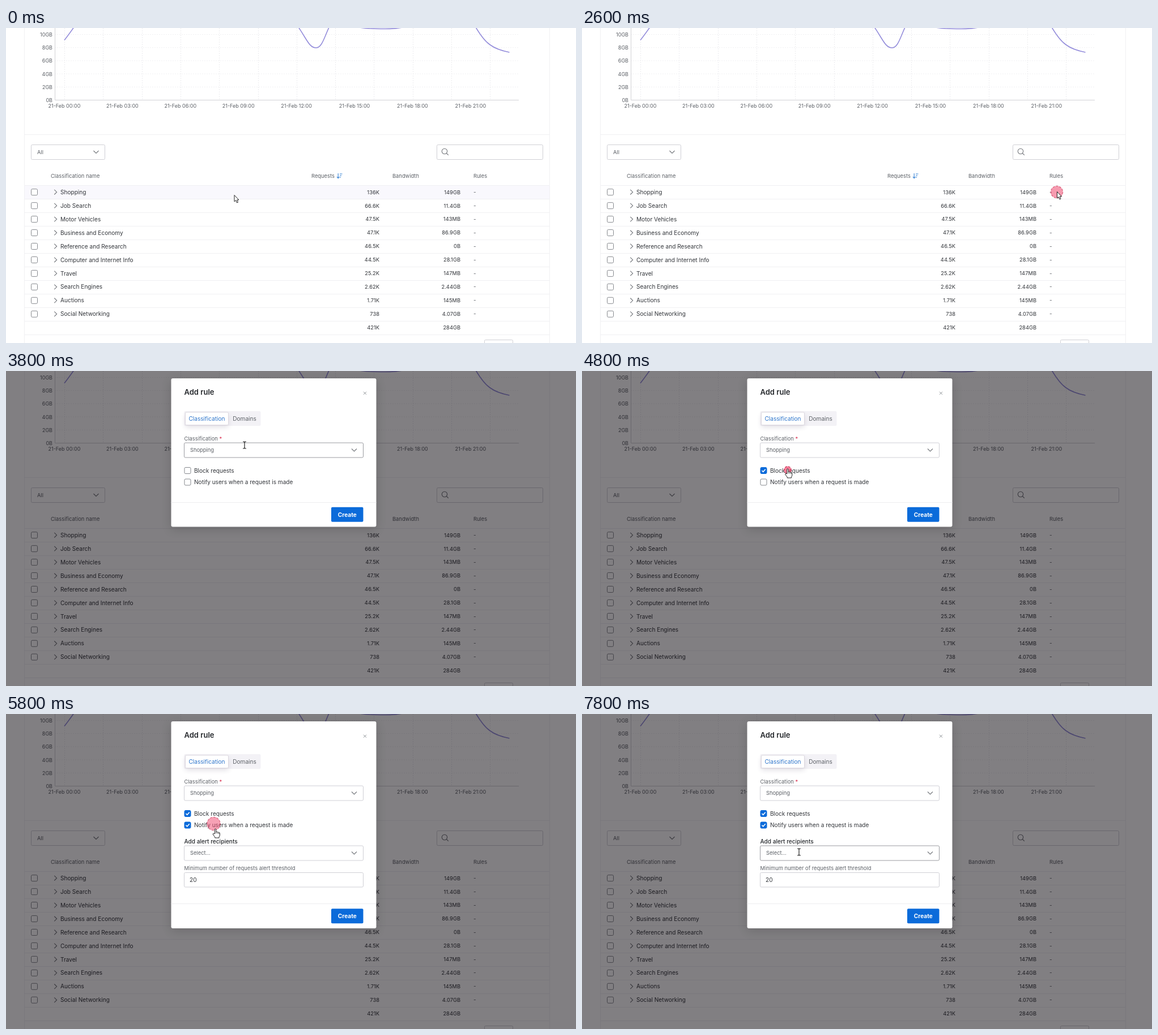
An HTML page with a canvas that plays this animation: 1006x557 px, repeating every 8000 ms.

```html
<!DOCTYPE html>
<html lang="en">
<head>
<meta charset="utf-8">
<title>Add rule</title>
<style>
  html, body { margin: 0; width: 100%; height: 100%; overflow: hidden; background: #fff; }
  canvas { display: block; }
</style>
</head>
<body>
<canvas id="stage" width="1006" height="557"></canvas>
<script>
const ctx = document.getElementById('stage').getContext('2d');
const LOOP = 8000, TICK = 200;
const SMALL = 9.36, BODY = 10.1;
const INK = '#33363b', GREY = '#5d6167', LINE = '#cfcfd5', FAINT = '#f0f0f3', BLUE = '#0b6bda';

const rows = [
  ['Shopping', '136K', '149GB'],
  ['Job Search', '66.6K', '11.4GB'],
  ['Motor Vehicles', '47.5K', '143MB'],
  ['Business and Economy', '47.1K', '86.9GB'],
  ['Reference and Research', '46.5K', '0B'],
  ['Computer and Internet Info', '44.5K', '28.1GB'],
  ['Travel', '25.2K', '147MB'],
  ['Search Engines', '2.62K', '2.44GB'],
  ['Auctions', '1.71K', '145MB'],
  ['Social Networking', '738', '4.07GB']
];

// time, x, y, pointer shape
const pointerKeys = [
  [0, 403, 296, 'arrow'], [800, 403, 296, 'arrow'], [1000, 428, 298, 'arrow'],
  [1200, 560, 303, 'arrow'], [1400, 760, 304, 'arrow'], [1600, 907, 299, 'arrow'],
  [2000, 838, 290, 'arrow'], [2200, 838, 290, 'hand'], [2600, 838.5, 290, 'arrow'],
  [2800, 839, 290, 'arrow'], [3000, 815, 288, 'arrow'], [3600, 450, 226, 'arrow'],
  [3800, 421, 131, 'beam'], [4000, 392, 98, 'arrow'], [4200, 374, 138, 'beam'],
  [4400, 363, 173, 'hand'], [5000, 363, 173, 'hand'], [5400, 366, 194, 'hand'],
  [5600, 366, 194, 'hand'], [5800, 369.5, 203, 'hand'], [6000, 375, 214, 'hand'],
  [6200, 383, 238, 'beam'], [7600, 383, 238, 'beam'], [7800, 383, 244, 'beam']
];

// start time, x, y
const clicks = [[2400, 838, 290], [4680, 363, 175], [5580, 366.5, 194]];

function pointerAt(t) {
  let i = pointerKeys.length - 1;
  while (pointerKeys[i][0] > t) i--;
  const a = pointerKeys[i], b = pointerKeys[i + 1] || a;
  const k = b === a ? 0 : (t - a[0]) / (b[0] - a[0]);
  return { x: a[1] + (b[1] - a[1]) * k, y: a[2] + (b[2] - a[2]) * k, shape: a[3] };
}

function text(str, x, y, { size = BODY, color = INK, weight = 400, align = 'left' } = {}) {
  ctx.font = `${weight} ${size}px Inter, sans-serif`;
  ctx.fillStyle = color;
  ctx.textAlign = align;
  ctx.fillText(str, x, y + size * 0.36);
}

function path(d, color, width = 1, fill) {
  const p = new Path2D(d);
  if (fill) { ctx.fillStyle = fill; ctx.fill(p); }
  if (color) { ctx.strokeStyle = color; ctx.lineWidth = width; ctx.stroke(p); }
}

function box(x, y, w, h, r, stroke, fill) {
  ctx.beginPath();
  ctx.roundRect(x, y, w, h, r);
  if (fill) { ctx.fillStyle = fill; ctx.fill(); }
  if (stroke) { ctx.strokeStyle = stroke; ctx.lineWidth = 1; ctx.stroke(); }
}

function shadow(color, blur, y) {
  ctx.shadowColor = color;
  ctx.shadowBlur = blur;
  ctx.shadowOffsetY = y;
}

const noShadow = () => shadow('transparent', 0, 0);
const chevronDown = (x, y) => path(`M${x - 4.5} ${y - 2.5}l4.5 4.5l4.5-4.5`, '#74777c', 1.1);

function checkbox(x, y, on) {
  box(x - 5.5, y - 5.5, 11, 11, 2, on ? BLUE : '#85888d', on ? BLUE : '#fff');
  if (on) path(`M${x - 3} ${y}l2.2 2.3l4-4.6`, '#fff', 1.5);
}

function drawChart() {
  ctx.setLineDash([2, 2]);
  for (let i = 0; i < 5; i++) path(`M86 ${11.5 + i * 23.2}H905`, '#f1f1f3');
  for (let i = 0; i < 12; i++) path(`M${Math.round(103 + i * 68.3) + 0.5} 0V127`, '#ececef');
  ctx.setLineDash([]);
  path('M86.5 0V127.5H905', '#d2d2d6');
  for (let i = 0; i < 6; i++) {
    text(i < 5 ? `${10 - 2 * i}GB` : '0B', 82, 11.7 + i * 23.2, { size: 9, color: GREY, align: 'right' });
  }
  for (let i = 0; i < 8; i++) {
    text(`21-Feb ${String(i * 3).padStart(2, '0')}:00`, 103 + i * 102.4, 137.7, { size: 9, color: GREY, align: 'center' });
  }
  path('M103 21.5C109 14 114 7 121 -3M515 -3C530 18 535 35 547 35C558 35 562 15 571 -3' +
    'M615 -3C630 1 640 .8 649 1.2C670 1.6 685 2 699 -1M828 -3C838 14 846 24 854 29.5C864 37 876 40.5 888.5 43', '#948ddb', 1.6);
}

function drawTable(hover) {
  path('M32.5 0V557M959.5 0V557M33 188.5H959', FAINT);
  box(44.5, 206.5, 130, 26, 2, LINE, '#fff');
  text('All', 55, 219.5, { size: SMALL, color: GREY });
  chevronDown(159, 219.5);
  box(760.5, 206.5, 187, 26, 2, LINE, '#fff');
  path('M778.7 218a4.7 4.7 0 1 1-9.4 0a4.7 4.7 0 1 1 9.4 0M777.5 221.5l3.3 3.3', '#74777c', 1.1);

  const head = { size: SMALL, color: GREY };
  text('Classification name', 79, 261.5, head);
  text('Requests', 539, 261.5, head);
  text('Bandwidth', 682, 261.5, head);
  text('Rules', 825, 261.5, head);
  path('M586.2 257V265.5M584 263.2l2.2 2.4l2.2-2.4M589 258h4.5M589 261h3.2M589 264h2', '#3b85d6', 1.1);

  if (hover) box(33, 278, 926, 24, 0, null, '#f9f8fd');
  const num = { size: SMALL, align: 'right' };
  path('M33 278.5H959', FAINT);
  rows.forEach(([name, requests, bandwidth], i) => {
    const y = 290.2 + i * 23.95;
    path(`M33 ${Math.round(y + 12) + 0.5}H959`, FAINT);
    checkbox(50, y, false);
    path(`M85.3 ${y - 4.3}l4.3 4.3l-4.3 4.3`, '#74777c', 1.1);
    text(name, 96, y);
    text(requests, 659, y, num);
    text(bandwidth, 802, y, num);
    text('-', 825, y, { color: GREY });
  });
  text('421K', 659, 529.7, num);
  text('284GB', 802, 529.7, num);
  path('M33 542.5H959', FAINT);
  box(844.5, 551.5, 50, 26, 2, LINE, '#fff');
}

function select(value, y, hover) {
  box(314.5, y + 0.5, 316, 26, 2, hover ? '#9a9ba0' : LINE, '#fff');
  ctx.save();
  ctx.beginPath();
  ctx.rect(315, y, 300, 18.5);
  ctx.clip();
  text(value, 325, y + 13.5, { size: SMALL, color: GREY });
  ctx.restore();
  chevronDown(614.5, y + 13.5);
}

function drawModal(t, pointer) {
  const blocked = t >= 4800, notify = t >= 5800;
  const bottom = notify ? 379 : 275.5;
  const over = y => pointer.shape === 'beam' && pointer.y > y && pointer.y < y + 26;

  ctx.save();
  if (t < 3000) ctx.translate(0, -10);
  shadow('rgba(0,0,0,.16)', 18, 4);
  box(291.5, 13, 362, bottom - 13, 3, null, '#fff');
  noShadow();

  text('Add rule', 314.5, 37, { size: 13, weight: 600, color: '#25282c' });
  path('M631 36.7l5 5M636 36.7l-5 5', '#8c8f94');
  box(314.5, 71, 135, 26, 2, null, '#f3f2f6');
  shadow('rgba(60,40,80,.14)', 8, 4);
  box(316.5, 73, 76, 22.5, 2, null, '#fff');
  noShadow();
  box(316.5, 73, 76, 22.5, 2, '#dcd8df');
  text('Classification', 354.5, 84.3, { color: '#2c74cb', align: 'center' });
  text('Domains', 421, 84.3, { color: GREY, align: 'center' });

  text('Classification', 314.5, 119.3, { size: SMALL, color: GREY });
  text('*', 376.5, 119.8, { size: SMALL, color: '#d8294a' });
  select('Shopping', 126.5, over(127));
  checkbox(320.5, 176, blocked);
  text('Block requests', 332, 176.3);
  checkbox(320.5, 196.5, notify);
  text('Notify users when a request is made', 332, 196.8);

  if (notify) {
    text('Add alert recipients', 314.5, 225, { weight: 500, color: '#25282c' });
    select('Select...', 232.5, over(233));
    text('Minimum number of requests alert threshold', 314.5, 272.3, { size: SMALL, color: GREY });
    box(314.5, 280.5, 316, 25.5, 2, LINE, '#fff');
    text('20', 324, 293.7);
  }

  path(`M291.5 ${Math.floor(bottom - 43.5) + 0.5}H653.5`, '#ededf0');
  box(574, bottom - 34.7, 56.5, 26, 2, null, BLUE);
  text('Create', 602.3, bottom - 21.5, { weight: 700, color: '#fff', align: 'center' });
  ctx.restore();
}

function drawClicks(t) {
  for (const [start, x, y] of clicks) {
    const age = t - start;
    if (age <= 0 || age > 450) continue;
    const alpha = Math.max(0.14, 1 - age / 480);
    ctx.beginPath();
    ctx.arc(x, y, age * 0.053, 0, Math.PI * 2);
    ctx.fillStyle = `rgba(240,82,118,${alpha})`;
    ctx.fill();
    if (age > 300) continue;
    ctx.setLineDash([4, 2]);
    ctx.strokeStyle = `rgba(196,42,78,${alpha})`;
    ctx.lineWidth = 1.3;
    ctx.stroke();
    ctx.setLineDash([]);
  }
}

function drawPointer({ x, y, shape }) {
  ctx.save();
  ctx.translate(x, y);
  ctx.lineJoin = 'round';
  if (shape === 'arrow') {
    path('M0 -.5V11L2.6 8.7L4.5 13L6.5 12.1L4.6 8H8Z', '#222', 1, '#fff');
  } else if (shape === 'hand') {
    path('M-1.2 9V1.2Q-1.2 0 0 0T1.2 1.2V5.5Q3 4.4 3.8 6Q5.4 5.2 6.1 6.7Q7.6 6.2 7.8 8V11' +
      'Q7.8 13 6.5 14.2V16H-.8V14.5L-4.2 10Q-4.6 8.3 -3.2 8.2Z', '#222', 1, '#fff');
    path('M1.2 5.5V8.5M3.8 6.2V8.7M6.1 7V9', '#222', 0.8);
  } else {
    path('M-3 -6H-1L0 -5L1 -6H3M0 -5V5M-3 6H-1L0 5L1 6H3', '#222', 1.2);
  }
  ctx.restore();
}

function draw(t) {
  const pointer = pointerAt(t);
  ctx.fillStyle = '#fff';
  ctx.fillRect(0, 0, 1006, 557);
  drawChart();
  drawTable(t < 2600);
  if (t >= 2800) {
    ctx.fillStyle = 'rgba(4,0,6,.5)';
    ctx.fillRect(0, 0, 1006, 557);
    drawModal(t, pointer);
  }
  drawClicks(t);
  drawPointer(pointer);
}

const began = performance.now();
function frame() {
  const t = (performance.now() - began) % LOOP;
  draw(Math.floor(t / TICK) * TICK);
  requestAnimationFrame(frame);
}
frame();
</script>
</body>
</html>
```
